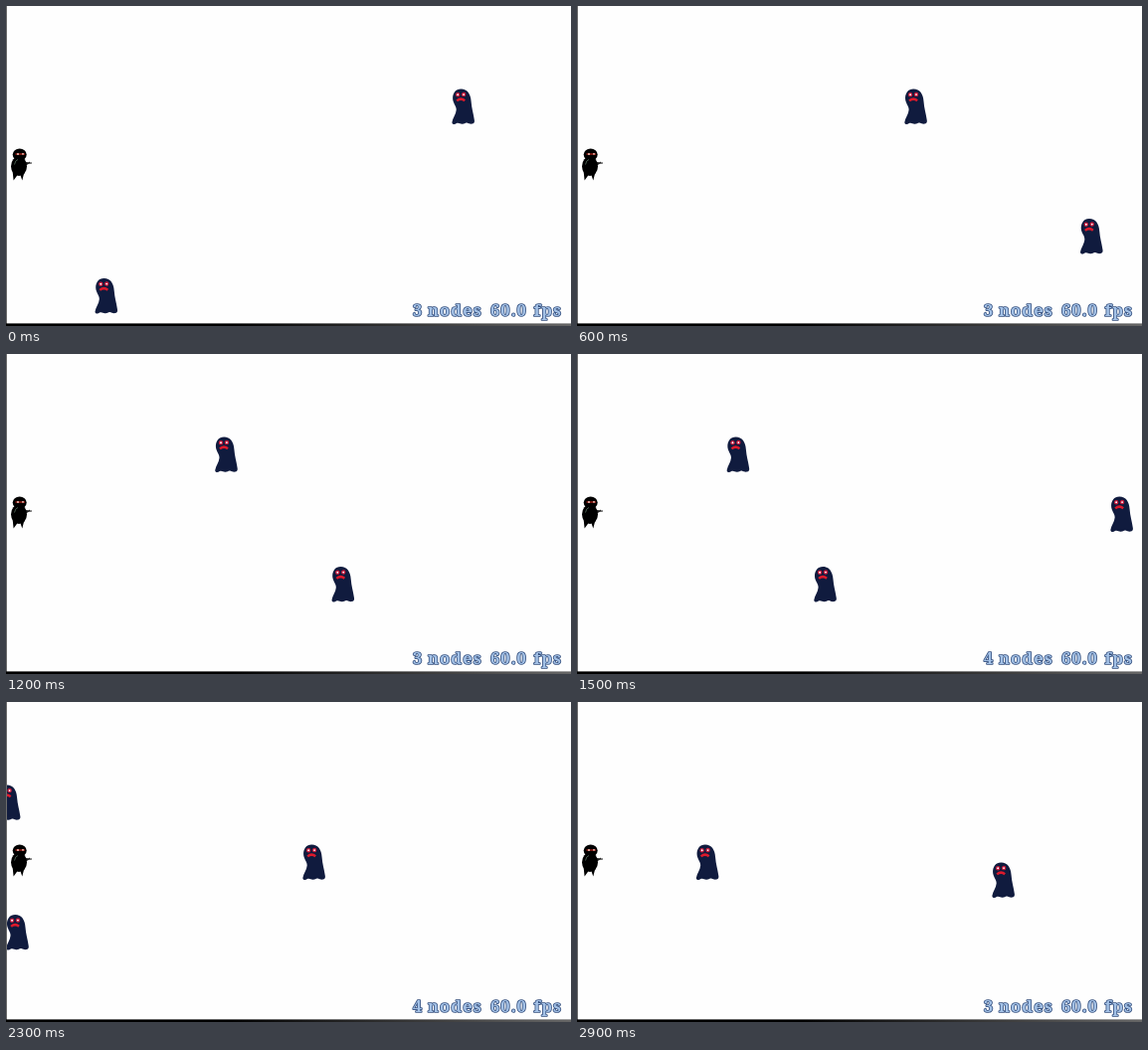
An HTML page for the animation above (3000 ms loop, 568x322 px).

```html
<!DOCTYPE html>
<html lang="en">
<head>
<meta charset="utf-8">
<style>
  html, body { margin: 0; width: 100%; height: 100%; overflow: hidden; background: #fefefe; }
  svg { display: block; }
  text {
    font: 600 16.5px "Noto Serif", serif; letter-spacing: 1.1px;
    fill: #a3c1e6; stroke: #344f7e; stroke-width: 1.6px; stroke-linejoin: round; paint-order: stroke;
  }
</style>
</head>
<body>
<svg width="568" height="322" viewBox="0 0 568 322">
  <defs>
    <linearGradient id="floor">
      <stop offset=".4" stop-color="#000"/>
      <stop offset="1" stop-color="#666"/>
    </linearGradient>
    <g id="ghost">
      <path fill="#101b3e" d="M9.5 .6C4 .6 1.2 4.8 1.2 10C1.3 15 5 17.5 4.8 21.5C4.5 26 1.2 29.5 .5 34C.5 36.5 3.5 36.5 5 35
        C7 34 8.5 35.5 10.5 35.8C13 36 13.5 34.3 15.5 34.6C17.5 35.5 19 36 21 35.6C23 35 23.4 33.5 22.8 31
        C22 25 20.2 20 19.7 13C19.3 6 16 .6 9.5 .6Z"/>
      <g fill="#fff" stroke="#c4183a" stroke-width="1.3">
        <circle cx="6.3" cy="6.3" r="1.6"/>
        <circle cx="12.2" cy="6.1" r="1.6"/>
      </g>
      <path d="M5.3 12.4Q9.3 9 13.3 12.2" fill="none" stroke="#dc1a2c" stroke-width="2.5"/>
    </g>
  </defs>
  <g id="ghosts"></g>
  <g id="player">
    <path d="M19 157L23 157.2L23.5 156.5L24.2 157.4L26 157.6V158.5L23 158.8L19 161Z" fill="#222"/>
    <path d="M6.5 165L7.6 175.4L11.6 170H14.4L16.3 175.4L19 165Z"/>
    <ellipse cx="13" cy="161.3" rx="8" ry="9.8"/>
    <ellipse cx="13.7" cy="149.6" rx="7" ry="6.2"/>
    <path d="M8.5 159.5L9.8 156L12 154.5" fill="none" stroke="#46584c"/>
    <path d="M9.5 149H19" stroke="#70150f" stroke-width="2"/>
    <circle cx="12" cy="149" r=".9" fill="#ffd8cc"/>
    <circle cx="17" cy="148.8" r=".9" fill="#ffd8cc"/>
  </g>
  <path d="M.5 0V320" stroke="#6c6c6c"/>
  <rect y="319.4" width="568" height="2.6" fill="url(#floor)"/>
  <text y="311.6"><tspan id="count" x="409">3</tspan><tspan x="424">nodes</tspan><tspan x="487">60.0</tspan><tspan x="530.5">fps</tspan></text>
</svg>
<script>
const LOOP = 3000, STEP = 100, STAGE_WIDTH = 568;

// spawn time in ms, top edge, speed in px per ms
const ghosts = [
  [-1610, 273.5, .2975],
  [-605, 83, .1985],
  [390, 213.5, .2975],
  [1392, 143, .2975],
  [2392, 161, .2975],
].map(([spawn, y, speed]) => {
  const node = document.createElementNS("http://www.w3.org/2000/svg", "use");
  node.setAttribute("href", "#ghost");
  document.getElementById("ghosts").append(node);
  return { spawn, y, speed, node };
});
const count = document.getElementById("count");

// The counter notices a new ghost slightly after it spawns.
function nodeCount(t) {
  if (t >= 1500 && t < 2400) return 4;
  return t === 400 || t === 2400 ? 2 : 3;
}

function draw(now) {
  const t = Math.floor(now % LOOP / STEP) * STEP;
  for (const { spawn, y, speed, node } of ghosts) {
    const x = STAGE_WIDTH - (t - spawn) * speed;
    node.setAttribute("transform", `translate(${x.toFixed(2)} ${y})`);
  }
  count.textContent = nodeCount(t);
}

const start = performance.now();
function tick() {
  draw(performance.now() - start);
  requestAnimationFrame(tick);
}
tick();
</script>
</body>
</html>
```
